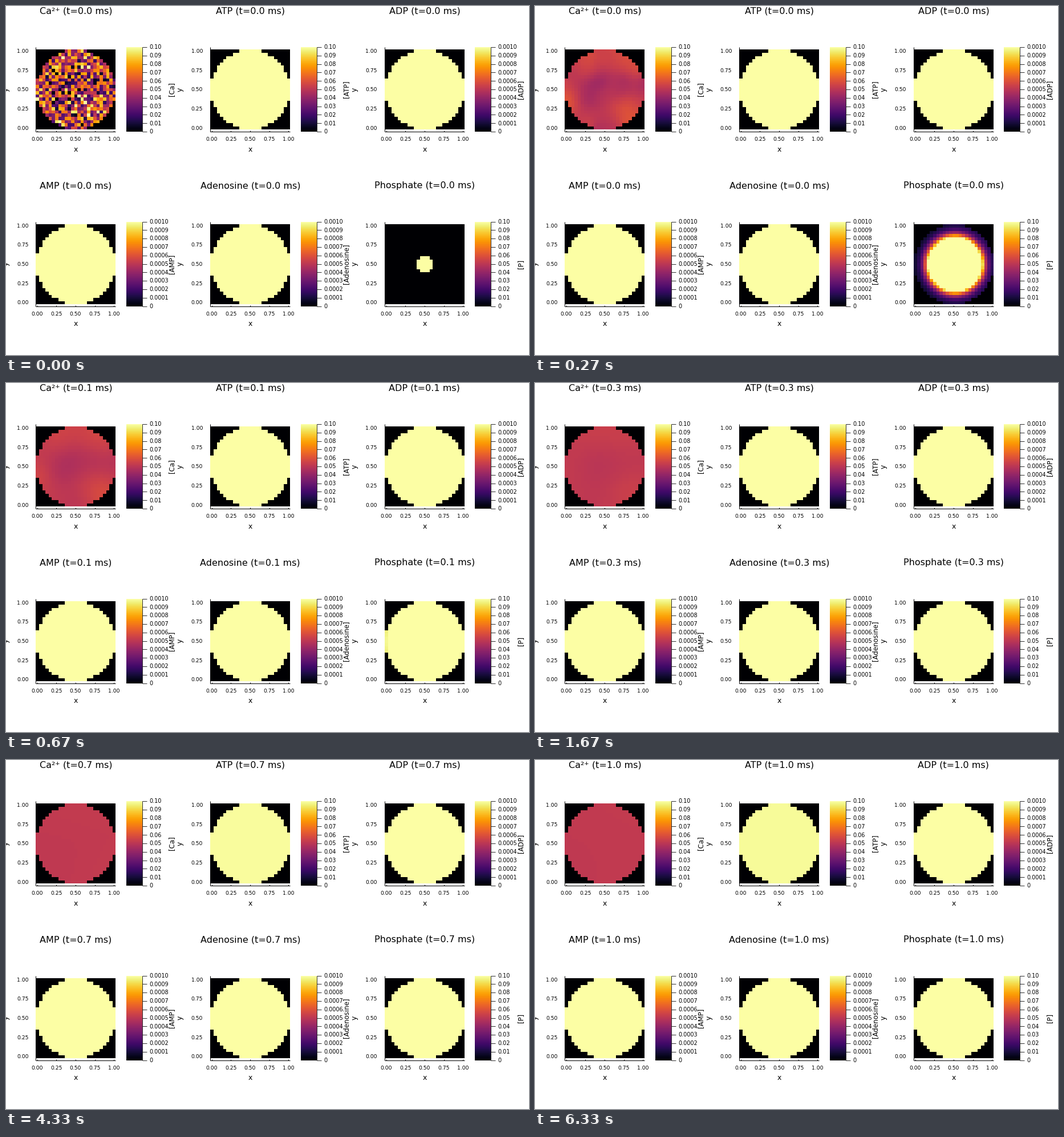
Animation, 917 px wide and 611 px high, one loop 6.67 s. Source, as a matplotlib script:

```python
import matplotlib.pyplot as plt
import numpy as np
from matplotlib.animation import FuncAnimation
from matplotlib.collections import LineCollection

W, H, DPI = 917, 611, 64
PT = 72 / DPI
FRAMES, INTERVAL = 230, 29       # one loop of 6670 ms
STEPS, STEP_MS = 100, 66.7       # states of the model in one loop
N, MID, SIDE = 25, 12, 140
SUBSTEPS = 10
CA_DIFF, P_DIFF = 0.65, 1.65     # cells^2 per step

plt.rcParams["font.family"] = "DejaVu Sans"

row, col = np.mgrid[0:N, 0:N].astype(float)
dist2 = (row - MID) ** 2 + (col - MID) ** 2
inside = dist2 <= 12.5 ** 2
cell = np.arange(SIDE) * N // SIDE


def diffuse(u, rate):
    """Spread u over one step, with no flow through the circle's edge."""
    wall = np.pad(inside, 1).astype(float)
    for _ in range(SUBSTEPS):
        v = np.pad(u, 1)
        flow = np.zeros_like(u)
        for dy, dx in ((0, 1), (2, 1), (1, 0), (1, 2)):
            part = np.s_[dy:dy + N, dx:dx + N]
            flow += wall[part] * (v[part] - u)
        u = np.where(inside, u + rate / SUBSTEPS * flow, 0)
    return u


def history(u, rate):
    states = [u]
    for _ in range(STEPS - 1):
        states.append(diffuse(states[-1], rate))
    return states


def calcium_start():
    # column, row, height, width of the broad patches under the noise
    bumps = [(7.2, 16, -.18, 1.8), (11, 9.5, -.14, 2), (5, 11, -.08, 2.2),
             (18, 10.5, -.12, 2.2), (24, 9, -.18, 1.6), (18.4, 18.6, .11, 3.3),
             (16.5, 3.5, .12, 2.2), (7, 3.5, .13, 1.8), (1, 14.6, .18, 1.9),
             (22.5, 7, .18, 1.4), (12, 23, -.10, 2), (7, 20, .08, 2)]
    base = np.full((N, N), 0.515)
    for x, y, height, width in bumps:
        base += height * np.exp(-((col - x) ** 2 + (row - y) ** 2) / (2 * width ** 2))
    noise = np.where(inside, np.random.default_rng(4).uniform(0, 1, (N, N)), 0)
    detail = noise - diffuse(noise, CA_DIFF)
    return np.where(inside, np.clip(base + detail, 0, 1), 0)


# Concentrations are relative to the top of each colour scale.
calcium = history(calcium_start(), CA_DIFF)
phosphate = history(np.where(dist2 < 6, 50 * (1 + 0.22 * (col - MID)), 0), P_DIFF)
full = inside.astype(float)

fig = plt.figure(figsize=(W / DPI, H / DPI), dpi=DPI, facecolor="white")
ax = fig.add_axes([0, 0, 1, 1])
ax.axis("off")
axis_lines, bar_lines = [], []


def text(x, y, s, px, ha="center", **kw):
    return ax.text(x, y, s, fontsize=px * PT, ha=ha, color="black", **kw)


def picture(data, left, right, top, bottom):
    return ax.imshow(data, cmap="inferno", vmin=0, vmax=1, interpolation="nearest",
                     extent=(left, right, bottom, top), aspect="auto", zorder=3)


def cells_to_pixels(grid):
    return grid[cell][:, cell]


def draw_panel(index, unit, top_value):
    r, c = divmod(index, 3)
    ox, oy = c * W / 3, r * H / 2
    left, top = 52 + 306 * c, 76 + 306 * r
    base = 220 + oy

    axis_lines.append([(left, 72 + oy), (left, base)])
    axis_lines.append([(left - .5, base), (left + SIDE, base)])
    image = picture(cells_to_pixels(full), left, left + SIDE, top, top + SIDE)

    for k in range(5):
        x = left + 2.8 + 33.6 * k
        label = f"{k / 4:.2f}"
        axis_lines.append([(x, base), (x, base - 2)])
        text(x, 236.3 + oy, label, 9.2)
        text(39.5 + ox, 216.8 - 33.7 * k + oy, label, 9.2, ha="right")

    text(122.6 + ox, 254.6 + oy, "x", 12.4)
    text(3.4 + ox, 146 + oy, "y", 12.4, rotation=90, rotation_mode="anchor")

    bar = 211 + ox
    picture(np.linspace(1, 0, 256)[:, None], round(bar), round(bar + 28),
            round(72 + oy), round(base))
    bar_lines.append([(bar + 28, 72 + oy), (bar + 28, base)])
    digits = 2 if top_value == 0.1 else 4
    for k in range(11):
        y = base - 14.8 * k
        label = f"{top_value * k / 10:.{digits}f}" if k else "0"
        bar_lines.append([(bar + 28, y), (bar + 36, y)])
        text(bar + 40.5, y + 3.4, label, 9.7, ha="left")
    text(291 + ox, 146 + oy, f"[{unit}]", 11.7, va="center", rotation=90)

    title = text(122.6 + ox, 14 + oy, "", 15.95)
    return image, title


species = [("Ca²⁺", "Ca", 0.1), ("ATP", "ATP", 0.1), ("ADP", "ADP", 0.001),
           ("AMP", "AMP", 0.001), ("Adenosine", "Adenosine", 0.001),
           ("Phosphate", "P", 0.1)]
panels = [draw_panel(i, unit, top) for i, (_, unit, top) in enumerate(species)]
ax.add_collection(LineCollection(axis_lines, colors="black", linewidths=PT,
                                 zorder=1))
ax.add_collection(LineCollection(bar_lines, colors="black", linewidths=0.8 * PT,
                                 zorder=4))
ax.set_xlim(0, W)
ax.set_ylim(H, 0)


def update(frame):
    n = int((frame * INTERVAL + INTERVAL - 1) / STEP_MS)
    panels[0][0].set_data(cells_to_pixels(calcium[n]))
    panels[1][0].set_data(cells_to_pixels(full * (1 - 0.013 * n / STEPS)))
    panels[5][0].set_data(cells_to_pixels(phosphate[n]))
    time = (n + 5) // 10 / 10
    for (name, _, _), (_, title) in zip(species, panels):
        title.set_text(f"{name} (t={time:.1f} ms)")
    return [artist for panel in panels for artist in panel]


anim = FuncAnimation(fig, update, frames=FRAMES, interval=INTERVAL,
                     repeat=True, repeat_delay=0, blit=False)
plt.show()
```
